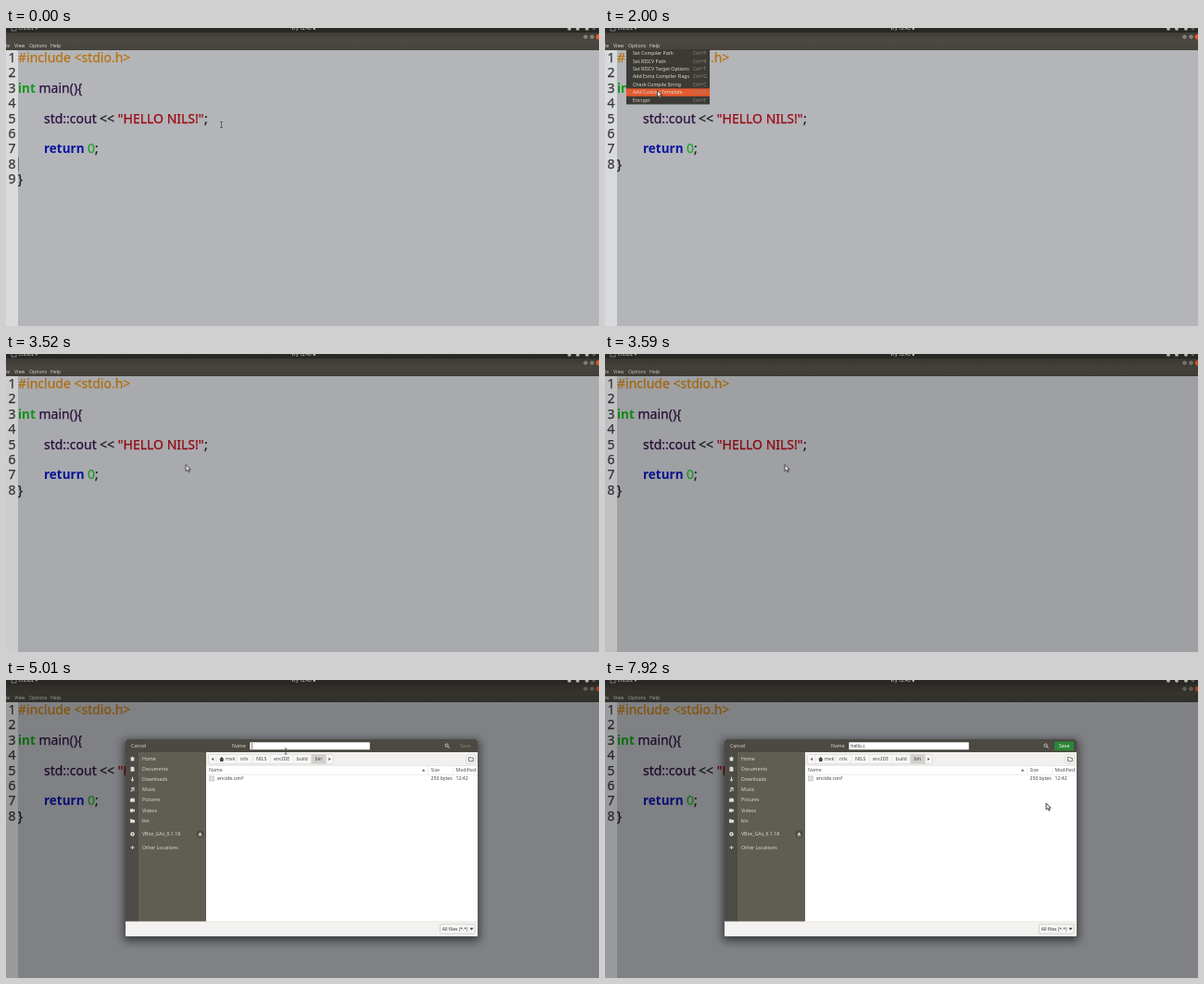
Recreate the animation shown at these times as an HTML page. Size 640x322 px, loop 8 s.

```html
<!DOCTYPE html>
<html lang="en">
<head>
<meta charset="utf-8">
<title>Code editor</title>
<style>
  html, body { margin: 0; width: 100%; height: 100%; overflow: hidden; background: #b3b5b9; }
  svg { display: block; width: 100vw; height: 100vh; font-family: "Noto Sans", "Open Sans", sans-serif; }
  text { white-space: pre; }
</style>
</head>
<body>
<svg id="stage" viewBox="0 0 640 322">
  <defs>
    <linearGradient id="bar" x2="0" y2="1">
      <stop stop-color="#403e38"/><stop offset=".5" stop-color="#4b4941"/><stop offset="1" stop-color="#45433c"/>
    </linearGradient>
    <filter id="shadow" x="-10%" y="-10%" width="120%" height="125%">
      <feGaussianBlur stdDeviation="5"/>
    </filter>
  </defs>
  <g id="editor"></g>
  <g id="chrome"></g>
  <rect id="dim" y="5" width="640" height="317" fill="#000"/>
  <g id="help"></g>
  <g id="options"></g>
  <g id="dialog"></g>
  <path id="arrow" d="M0 0V7.2L1.8 5.7L3 8.2L4.2 7.6L3.1 5.2H5.3Z" fill="#e4e4e4" stroke="#2d2d2d" stroke-width=".8"/>
  <path id="beam" d="M-1.4 -3H1.4M0 -3V3M-1.4 3H1.4" fill="none" stroke="#444" stroke-width=".7"/>
</svg>
<script>
const LOOP = 8000;
const $ = id => document.getElementById(id);

function add(parent, tag, attrs, content = "") {
  const node = document.createElementNS("http://www.w3.org/2000/svg", tag);
  for (const key in attrs) node.setAttribute(key, attrs[key]);
  node.textContent = content;
  return parent.appendChild(node);
}
const rect = (g, x, y, width, height, fill, more) => add(g, "rect", { x, y, width, height, fill, ...more });
const line = (g, d, stroke, width = .6) => add(g, "path", { d, stroke, fill: "none", "stroke-width": width });
// y is the middle of the lowercase letters
const label = (g, x, y, words, fill, size = 5.2, more) =>
  add(g, "text", { x, y: y + size * .31, fill, "font-size": size, ...more }, words);
const show = (node, on) => node.setAttribute("visibility", on ? "visible" : "hidden");

// Editor
const editor = $("editor");
const rowY = row => 32.7 + (row - 1) * 16.4;
const code = (x, row, words, fill, weight = 400) =>
  label(editor, x, rowY(row), words, fill, weight > 400 ? 13.5 : 14,
    { "font-weight": weight, stroke: fill, "stroke-width": weight > 400 ? 0 : .25 });

rect(editor, 0, 0, 640, 322, "#b3b5b9");
rect(editor, 0, 23, 13, 299, "#d9dadb");
for (let row = 1; row <= 8; row++) code(2.6, row, row, "#38383c");
const lastNumber = code(2.6, 9, 9, "#38383c");
code(13, 1, "#include <stdio.h>", "#b87410");
code(13, 3, "int", "#139a1b", 700);
code(35.5, 3, "main(){", "#2c103f");
code(41, 5, "std::cout", "#2c103f");
code(101, 5, "<<", "#1c1c20");
code(120.8, 5, "\"HELLO NILS!\"", "#9c0812");
code(214, 5, ";", "#1c1c20");
code(41, 7, "return", "#0b14a0", 700);
code(88, 7, "0", "#22a52b");
code(96, 7, ";", "#1c1c20");
const braces = [8, 9].map(row => code(12.8, row, "}", "#1c1c20"));
const caret = rect(editor, 13, 139.5, .8, 15, "#5c5c72");

// Top panel and menu bar
const chrome = $("chrome");
rect(chrome, 0, 5, 640, 19, "url(#bar)");
rect(chrome, 0, 0, 640, 5, "#292825");
rect(chrome, 6, -2, 5, 5, "none", { stroke: "#aaa", "stroke-width": .6 });
label(chrome, 14, .2, "EncIDE ▾", "#c8c5bd", 5);
label(chrome, 308, .2, "Vry 12:43 ●", "#dddad2", 5);
[608, 617, 627].forEach(x => add(chrome, "circle", { cx: x, cy: .8, r: 1.9, fill: "#b9b6ae" }));
line(chrome, "M633 0l1.5 2L636 0", "#c8c5bd");
[625.5, 632.5].forEach(x => add(chrome, "circle", { cx: x, cy: 9.6, r: 2.7, fill: "#85827a", stroke: "#2c2b27", "stroke-width": .5 }));
add(chrome, "circle", { cx: 639.5, cy: 9.6, r: 2.8, fill: "#e65a2c" });
[[-4, "File"], [9, "View"], [25, "Options"], [48, "Help"]].forEach(([x, name]) => label(chrome, x, 19.3, name, "#dedbd2"));

// Menus
const help = $("help"), options = $("options");
rect(help, 46, 23, 36, 9.5, "#3c3a35");
label(help, 53, 27.8, "About", "#d8d5cc");
label(help, 72, 27.8, "F1", "#827f77", 4.6);

rect(options, 23, 23, 90, 59.5, "#3c3a35");
const itemY = i => 27.7 + i * 8.38;
const highlight = rect(options, 23, 0, 90, 8.4, "#e4592d");
[["Set Compiler Path", "P"], ["Set RISCV Path", "R"], ["Set RISCV Target Options", "T"], ["Add Extra Compiler Flags", "G"],
 ["Check Compile String", "C"], ["Add Custom Template", "X"], ["Encrypt", "E"]].forEach(([name, key], i) => {
  label(options, 30, itemY(i), name, "#dedbd2");
  label(options, 95, itemY(i), "Ctrl+" + key, "#8f8b82", 5);
});

// Save dialog
const dialog = $("dialog");
rect(dialog, 127, 65, 384, 217, "#000", { opacity: .55, filter: "url(#shadow)" });
rect(dialog, 129, 64, 380, 213, "#fff", { rx: 2 });
add(dialog, "path", { d: "M129 78V66q0-2 2-2H507q2 0 2 2V78Z", fill: "#4b4942" });
label(dialog, 135, 71.3, "Cancel", "#d6d3ca");
label(dialog, 244, 71.3, "Name", "#d6d3ca");
rect(dialog, 263, 67, 130, 8.6, "#fff", { rx: 1, stroke: "#33322d", "stroke-width": .5 });
const fileName = label(dialog, 265.3, 71.3, "", "#333", 5);
const nameCaret = rect(dialog, 265, 68, .6, 6.6, "#333");
add(dialog, "circle", { cx: 475.6, cy: 70.6, r: 1.6, fill: "none", stroke: "#e2dfd6", "stroke-width": .8 });
line(dialog, "M476.8 71.8l1.7 1.8", "#e2dfd6", .9);
const saveButton = rect(dialog, 485, 66.6, 21, 9.6, "#2c8538", { rx: 1.2 });
const saveLabel = label(dialog, 490, 71.3, "Save", "#87847b");

rect(dialog, 129, 78, 87, 183, "#605e53");
rect(dialog, 129, 78, 14, 183, "#4d4b45");
rect(dialog, 216, 78, 293, 14.5, "#f1f0ee");
rect(dialog, 129, 261, 380, 16, "#f3f2f0", { rx: 1.5 });
line(dialog, "M129 261H509M216.5 92.5H509M216.5 102.3H509", "#d9d7d3", .5);

const icons = {
  Home: "M-2.6 0L0-2.6L2.6 0H1.8V2.4H-1.8V0Z",
  Documents: "M-2-2.5H1L2-1.5V2.5H-2Z",
  Downloads: "M-.5-2.6H.5V0H2L0 2.4L-2 0H-.5Z",
  Music: "M-1-2.5H2V1.5H1V-1.4H0V2H-2V.8H-1Z",
  Pictures: "M-2.5-1.6H-1L-.6-2.3H.9L1.2-1.6H2.5V2H-2.5Z",
  Videos: "M-2.5-1.7H1V-.5L2.5-1.5V1.5L1 .5V1.7H-2.5Z",
  bin: "M-2.5-2H-.4L.2-1.3H2.5V2H-2.5Z",
  "VBox_GAs_6.1.18": "M-2.3 0a2.3 2.3 0 1 0 4.6 0a2.3 2.3 0 1 0-4.6 0M-.7 0a.7.7 0 1 1 1.4 0a.7.7 0 1 1-1.4 0",
  "Other Locations": "M-.4-2H.4V-.4H2V.4H.4V2H-.4V.4H-2V-.4H-.4Z"
};
Object.keys(icons).forEach((name, i) => {
  const y = i < 7 ? 85 + i * 11.2 : i === 7 ? 166.5 : 181;
  add(dialog, "path", { d: icons[name], fill: "#dedbd2", "fill-rule": "evenodd", transform: `translate(136.5 ${y})` });
  label(dialog, 147, y, name, "#dcd9d0");
});
add(dialog, "circle", { cx: 209.5, cy: 166.5, r: 4, fill: "#4b4942" });
add(dialog, "path", { d: "M207.6 167L209.5 164.6L211.4 167ZM207.6 167.6H211.4V168.4H207.6Z", fill: "#e2dfd6" });

rect(dialog, 218.5, 80.3, 134.5, 10.4, "#f8f7f6", { rx: 1.2, stroke: "#c8c5c0", "stroke-width": .5 });
rect(dialog, 329.5, 80.3, 16, 10.4, "#d2d0cc");
line(dialog, "M227 80.5V90.5M249 80.5V90.5M266 80.5V90.5M285.5 80.5V90.5M310 80.5V90.5M329.5 80.5V90.5M345.5 80.5V90.5", "#d9d6d2", .5);
add(dialog, "path", { d: "M224 83.7V87.3L221.8 85.5ZM348.3 83.7V87.3L350.5 85.5Z", fill: "#555" });
add(dialog, "path", { d: icons.Home, fill: "#444", transform: "translate(232.8 85.5)" });
[[237, "mvk"], [253, "nils"], [270, "NILS"], [289, "encIDE"], [313.5, "build"], [333.5, "bin"]]
  .forEach(([x, name]) => label(dialog, x, 85.5, name, "#484848"));
rect(dialog, 497, 80.8, 9.5, 9.4, "#f8f7f6", { rx: 1, stroke: "#c8c5c0", "stroke-width": .5 });
line(dialog, "M499.5 83.5H501.3L501.9 84.2H504.3V87.8H499.5Z", "#555", .8);

[[219, "Name"], [458.5, "Size"], [485.5, "Modified"]].forEach(([x, name]) => label(dialog, x, 97.5, name, "#555"));
line(dialog, "M455.5 93V102M483 93V102", "#dddbd8", .5);
add(dialog, "path", { d: "M449 98.4L450.7 96.2L452.4 98.4Z", fill: "#555" });
rect(dialog, 219.7, 104, 5, 5, "#e2e1df", { stroke: "#aaa", "stroke-width": .5 });
[[228, "encide.conf"], [458.5, "250 bytes"], [485.5, "12:42"]].forEach(([x, name]) => label(dialog, x, 106.6, name, "#444"));
rect(dialog, 468.5, 264, 37.5, 10, "#f8f7f6", { rx: 1.2, stroke: "#bfbcb7", "stroke-width": .6 });
label(dialog, 470.8, 269, "All files (*.*)", "#333", 5);
add(dialog, "path", { d: "M500.5 267.8H504.5L502.5 270.4Z", fill: "#444" });

// Pointer stops: time, x, y
const route = [
  [0, 232.5, 104.5], [430, 232.5, 104.5], [860, 53, 19], [960, 53, 19], [1180, 71.5, 68], [1240, 71.5, 68],
  [1520, 34, 18], [1640, 34, 20], [1980, 56.5, 67.5], [2100, 56.5, 68], [2460, 36, 18], [2540, 36, 18],
  [2960, 186, 128], [3040, 186, 128], [3460, 194, 119.5], [3600, 194, 119.5], [3930, 266, 90],
  [4000, 266, 90], [4500, 312, 72], [4710, 310, 73], [5000, 302, 77], [7060, 302, 77], [7880, 476, 133], [LOOP, 476, 133]
];
const clamp = v => Math.max(0, Math.min(1, v));
const ramp = (t, from, to) => clamp((t - from) / (to - from));

function pointerAt(t) {
  const i = Math.max(1, route.findIndex(stop => stop[0] > t));
  const [t0, x0, y0] = route[i - 1], [t1, x1, y1] = route[i];
  const p = ramp(t, t0, t1), k = p * p * (3 - 2 * p);
  return [x0 + (x1 - x0) * k, y0 + (y1 - y0) * k];
}

const keyTimes = [5600, 5690, 5780, 5870, 5960, 6130, 6390];

function render(t) {
  const longFile = t < 210;
  show(lastNumber, longFile);
  show(braces[0], !longFile);
  show(braces[1], longFile);
  show(caret, longFile);

  const [x, y] = pointerAt(t);
  const menuOpen = t >= 1520 && t < 2500;
  show(help, t >= 920 && t < 1460);
  show(options, menuOpen);
  const item = Math.floor((y - 23.5) / 8.38);
  show(highlight, menuOpen && item >= 0);
  highlight.setAttribute("y", itemY(item) - 4.2);

  $("dim").setAttribute("opacity", .29 * ramp(t, 3450, 3800));
  const grow = ramp(t, 3610, 3760), scale = .9 + .1 * grow;
  show(dialog, grow > 0);
  dialog.setAttribute("opacity", grow);
  dialog.setAttribute("transform", `translate(319 170.5) scale(${scale}) translate(-319 -170.5)`);

  const typed = keyTimes.filter(time => time <= t).length;
  fileName.textContent = "hello.c".slice(0, typed);
  const typing = t >= 5520 && t < 6640;
  show(nameCaret, grow > 0 && t >= 4710 && (typing || (t - 4710) % 1200 < 600));
  nameCaret.setAttribute("x", 265.3 + (typed ? fileName.getComputedTextLength() : 0));
  show(saveButton, typed > 0);
  saveLabel.setAttribute("fill", typed ? "#fff" : "#87847b");

  const overName = x > 263 && x < 393 && y > 66 && y < 78;
  const overCode = y > 24 && !menuOpen && t < 3000;
  const beam = t < 3600 ? overCode : t > 4000 && overName;
  const hidden = t > 5600 && t < 7060;
  show($("beam"), beam && !hidden);
  show($("arrow"), !beam && !hidden);
  for (const id of ["beam", "arrow"]) $(id).setAttribute("transform", `translate(${x} ${y})`);
}

const start = performance.now();
function tick() {
  render((performance.now() - start) % LOOP);
  requestAnimationFrame(tick);
}
tick();
</script>
</body>
</html>
```
